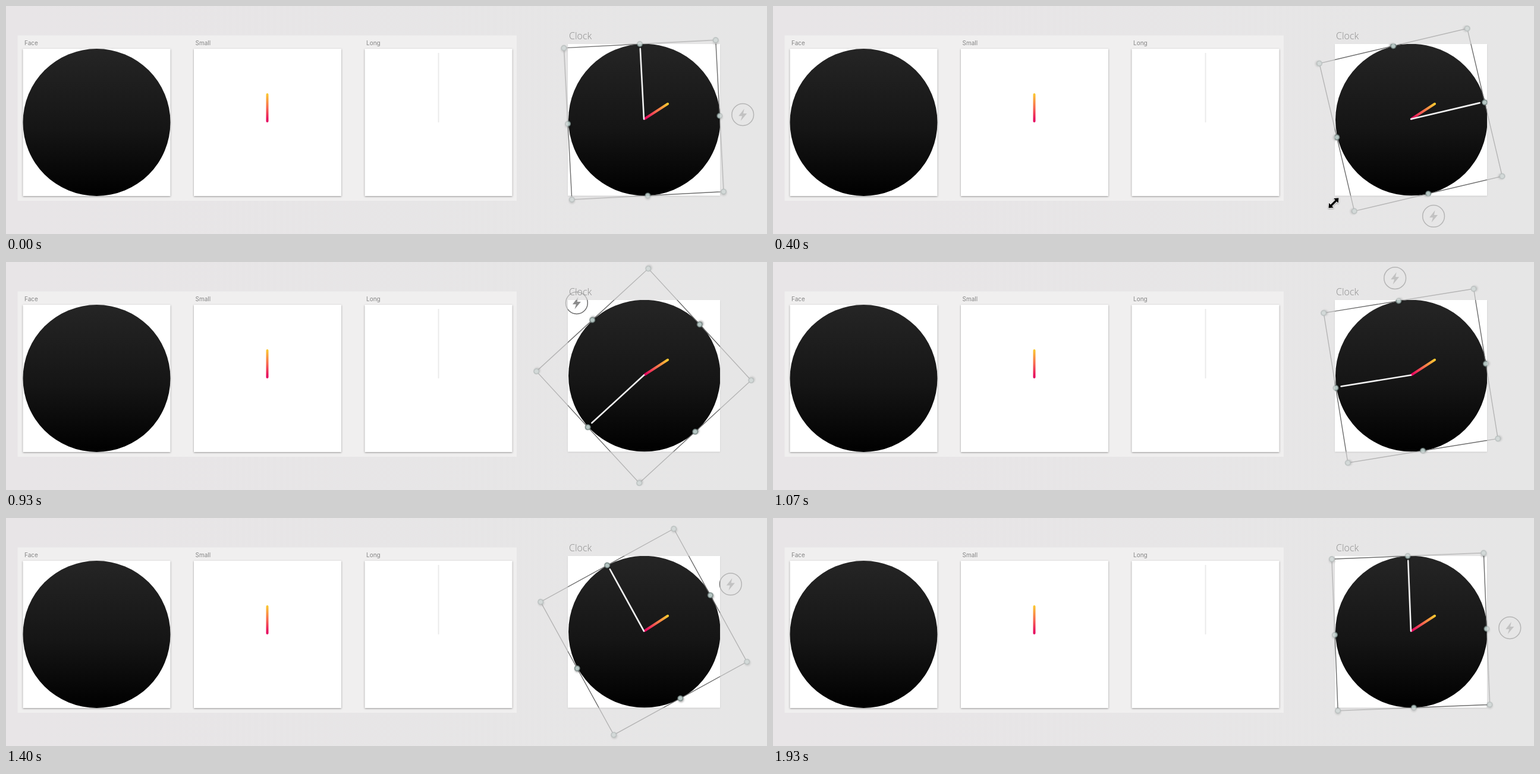
These frames come from a looping animation (1280x384 px, 2000 ms). An HTML page:

```html
<!DOCTYPE html>
<html lang="en">
<head>
<meta charset="utf-8">
<title>Clock</title>
<style>
  html, body { margin: 0; width: 100%; height: 100%; overflow: hidden; background: #e6e6e6; }
  svg { display: block; }
  .board { fill: #fff; filter: drop-shadow(0 1px 1.5px rgba(0, 0, 0, .38)); }
  .label { font: 10px Inter, sans-serif; fill: #858585; }
  .title { font: 300 16px "Open Sans", sans-serif; fill: #8c8c8c; }
  .short { fill: none; stroke: url(#flame); stroke-width: 4; stroke-linecap: round; }
  .knob { fill: #b6c6c3; stroke: #70807e; stroke-width: 1.4; filter: drop-shadow(0 2px 1.5px rgba(0, 0, 0, .35)); }
  .cursor { stroke-linejoin: round; filter: drop-shadow(0 1.5px 1px rgba(0, 0, 0, .35)); }
</style>
</head>
<body>
<svg width="1280" height="384" viewBox="0 0 1280 384">
  <defs>
    <linearGradient id="backdrop">
      <stop stop-color="#e8e5e7"/><stop offset="1" stop-color="#e6e6e6"/>
    </linearGradient>
    <linearGradient id="dark" x2="0" y2="1">
      <stop stop-color="#252525"/><stop offset=".55" stop-color="#151515"/><stop offset="1" stop-color="#000"/>
    </linearGradient>
    <linearGradient id="flame" gradientUnits="userSpaceOnUse" x1="0" y1="0" x2="0" y2="-46">
      <stop stop-color="#e5005f"/><stop offset=".5" stop-color="#f8694f"/><stop offset="1" stop-color="#fbc92f"/>
    </linearGradient>
    <clipPath id="inside"><path d="M945 64H1201V319.5H945Z"/></clipPath>
    <clipPath id="outside"><path clip-rule="evenodd" d="M0 0H1280V384H0ZM945 64H1201V319.5H945Z"/></clipPath>
    <g id="overlay">
      <g id="box">
        <rect x="-127.8" y="-127.8" width="255.6" height="255.6" fill="none" stroke="#6c6c6c" stroke-width="1.4"/>
        <g id="knobs"></g>
      </g>
      <g id="badge">
        <circle r="18.4" fill="none" stroke="#6c6c6c" stroke-width="1.5"/>
        <path d="M2.5-10L-7 2.2H-1L-3.5 10.5L7-2H.8Z" fill="#8c8c8c"/>
      </g>
    </g>
  </defs>

  <rect width="1280" height="384" fill="url(#backdrop)"/>
  <rect x="19.5" y="49.5" width="839.5" height="278.5" fill="#f0efef"/>
  <rect class="board" x="28.5" y="72" width="248" height="248"/>
  <rect class="board" x="316" y="72" width="248" height="248"/>
  <rect class="board" x="603.5" y="72" width="248" height="248"/>
  <text class="label" x="31" y="66">Face</text>
  <text class="label" x="318.5" y="66">Small</text>
  <text class="label" x="606" y="66">Long</text>
  <circle cx="152.5" cy="196" r="124" fill="url(#dark)"/>
  <path class="short" transform="translate(439.5 194)" d="M0 0L.01-45"/>
  <path d="M727.5 79V196" stroke="#ebebeb" stroke-width="2"/>

  <rect x="945" y="64" width="256" height="255.5" fill="#fff" style="filter:drop-shadow(0 1px 1px rgba(0,0,0,.12))"/>
  <circle cx="1073.8" cy="191.6" r="127.8" fill="url(#dark)" clip-path="url(#inside)"/>
  <text class="title" x="947" y="56">Clock</text>
  <path class="short" transform="translate(1074.5 189.8) rotate(57)" d="M0 0L.01-46"/>
  <path id="long" d="M0 0V-119" stroke="#f1f1f1" stroke-width="2.6" stroke-linecap="round"/>

  <g clip-path="url(#outside)"><use href="#overlay" opacity=".4"/></g>
  <g clip-path="url(#inside)"><use href="#overlay"/></g>

  <g id="cursor" class="cursor">
    <path id="hand" fill="#fff" stroke="#111" stroke-width="1.4"
      d="M-3 10V7L-8 1Q-9-2-6-1L-4 1V-8Q-2.5-10-1-8V-3Q1-4 2-2.5Q4-3.5 5-2Q7-3 8-1V4L6 7V10ZM-.5 3V7M2 3V7M4.5 3V7"/>
    <path id="resize" fill="#000" stroke="#fff" stroke-width="1.6" transform="rotate(45)" paint-order="stroke"
      d="M0-12L5.5-5.5H1.7V5.5H5.5L0 12L-5.5 5.5H-1.7V-5.5H-5.5Z"/>
  </g>
</svg>
<script>
const LOOP = 2000, STEPS = 30, CX = 1072.75, CY = 191.7;
const $ = id => document.getElementById(id);

// step, hand angle in degrees, angular speed per step
const turn = [
  [0, -3, 2], [6, 76.7, 20], [10, 176.4, 16], [14, 227.4, 14],
  [19, 310.1, 12], [24, 350.3, 3.5], [29, 357.7, 0]
];
// pointer distance from the centre for the steps in which it crosses the stage
const reach = { 5: 197, 6: 191, 7: 195, 8: 208, 9: 235, 10: 264 };

function angleAt(step) {
  const i = Math.max(1, turn.findIndex(row => row[0] >= step));
  const [s0, a0, v0] = turn[i - 1], [s1, a1, v1] = turn[i];
  const d = s1 - s0, u = (step - s0) / d, w = 1 - u;
  return w * w * (1 + 2 * u) * a0 + u * u * (3 - 2 * u) * a1 + d * u * w * (w * v0 - u * v1);
}

function polar(degrees, radius) {
  const a = degrees * Math.PI / 180;
  return `translate(${CX + radius * Math.sin(a)} ${CY - radius * Math.cos(a)})`;
}

for (let x = -1; x <= 1; x++) for (let y = -1; y <= 1; y++) {
  if (!x && !y) continue;
  const knob = document.createElementNS("http://www.w3.org/2000/svg", "circle");
  knob.setAttribute("class", "knob");
  knob.setAttribute("cx", x * 127.8);
  knob.setAttribute("cy", y * 127.8);
  knob.setAttribute("r", 4.2);
  $("knobs").append(knob);
}

function draw(step) {
  const angle = angleAt(step), radius = reach[step];
  $("box").setAttribute("transform", `translate(${CX} ${CY}) rotate(${angle})`);
  $("long").setAttribute("transform", `translate(1073 190.5) rotate(${angle})`);
  $("badge").setAttribute("transform", polar(angle + 90, 166.7));
  $("cursor").style.display = radius ? "" : "none";
  if (radius) {
    $("cursor").setAttribute("transform", polar(angle + 146.1 - (step - 6) * 1.1, radius));
    $("resize").style.display = step === 6 ? "" : "none";
    $("hand").style.display = step === 6 ? "none" : "";
  }
}

function tick() {
  const time = performance.now() % LOOP;
  draw(Math.floor((time + 4) * STEPS / LOOP) % STEPS);
  requestAnimationFrame(tick);
}
tick();
</script>
</body>
</html>
```
